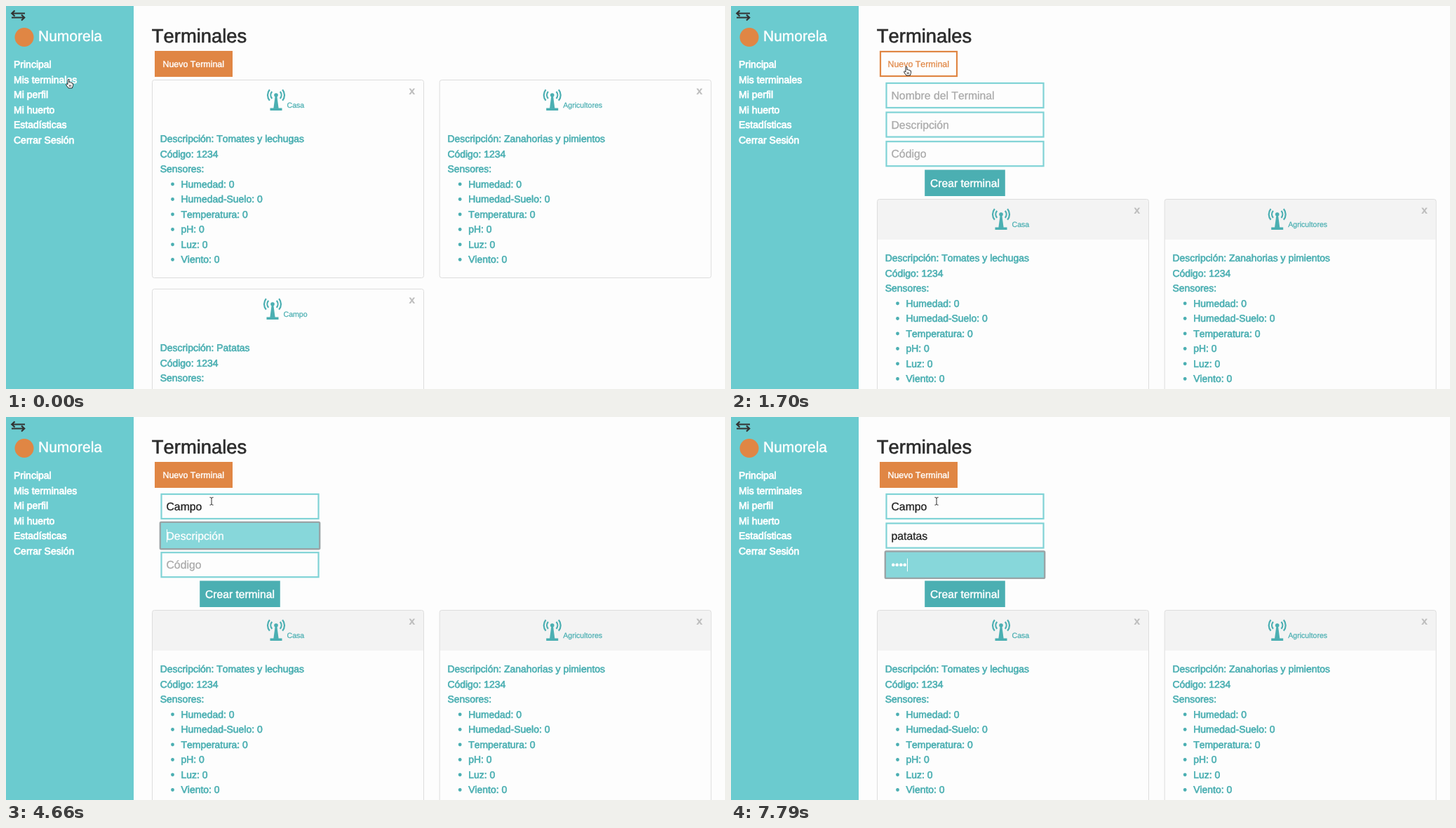
Animation, 1025 px wide and 546 px high, one loop 8 s. Source, as an HTML page:

```html
<!DOCTYPE html>
<html lang="es">
<head>
<meta charset="utf-8">
<title>Terminales</title>
<style>
  html, body { margin: 0; width: 100%; height: 100%; overflow: hidden; background: #fdfdfd; }
  #stage { display: block; }
  text {
    font-family: "Liberation Sans", Arial, sans-serif; font-kerning: none;
    white-space: pre; text-rendering: geometricPrecision;
  }
</style>
</head>
<body>
<svg id="stage" width="1025" height="546" viewBox="0 0 1025 546"></svg>
<script>
const LOOP = 8000;
const TEAL = '#4bafb2', ORANGE = '#e08644', PAGE = '#fdfdfd';
const stage = document.getElementById('stage');
const pen = document.createElement('canvas').getContext('2d');

const menu = ['Principal', 'Mis terminales', 'Mi perfil', 'Mi huerto', 'Estadísticas', 'Cerrar Sesión'];
const sensors = ['Humedad', 'Humedad-Suelo', 'Temperatura', 'pH', 'Luz', 'Viento'];
const cards = [
  { x: 208, dy: 0, name: 'Casa', icon: 177, crop: 'Tomates y lechugas' },
  { x: 617.7, dy: 0, name: 'Agricultores', icon: 161, crop: 'Zanahorias y pimientos' },
  { x: 208, dy: 298, name: 'Campo', icon: 172, crop: 'Patatas' }
];
// keys: the time of each keystroke; rest: when the caret is blinked off
const fields = [
  { hint: 'Nombre del Terminal', value: 'Campo', focus: 2290, blur: 4660,
    keys: [3630, 3780, 3930, 4060, 4210], rest: [2880, 3330] },
  { hint: 'Descripción', value: 'patatas', focus: 4660, blur: 6590,
    keys: [5400, 5550, 5700, 5700, 5840, 5990, 6140], rest: [5110, 5400] },
  { hint: 'Código', value: '••••', focus: 6590, blur: LOOP,
    keys: [7190, 7340, 7640, 7790], rest: [7040, 7190] }
];
const pointer = [
  [0, 85, 104], [140, 103, 102], [290, 172, 93], [500, 232, 88], [650, 246, 86],
  [1850, 283, 113], [1990, 293, 120]
];

const within = (t, from, to) => t >= from && t < to;

function rect(x, y, w, h, fill, extra = '') {
  return `<rect x="${x}" y="${y}" width="${w}" height="${h}" fill="${fill}" ${extra}/>`;
}

// weight thickens the regular face towards a medium one
function text(x, y, str, size, fill, weight = 0, extra = '') {
  return `<text x="${x}" y="${y}" font-size="${size}" fill="${fill}" stroke="${fill}" stroke-width="${weight}" ${extra}>${str}</text>`;
}

function sidebar() {
  const arrows = '<path d="M9 10.5H27M12.5 6.5L8.3 10.5L12.5 14.5M8 16.5H25.5M22 12.5L26.2 16.5L22 20.5" fill="none" stroke="#333" stroke-width="2.2"/>';
  return rect(0, 0, 182, 546, '#6bcbcf') + arrows +
    `<circle cx="26" cy="44.5" r="13.5" fill="${ORANGE}"/>` +
    text(46, 50, 'Numorela', 21, '#fff', 0.4) +
    menu.map((item, i) => text(11, 88 + i * 21.5, item, 14, '#fff', 0.75)).join('');
}

function newButton(hover) {
  return hover
    ? rect(213, 65, 109, 35, PAGE, `stroke="${ORANGE}" stroke-width="2.2"`) + text(223.5, 87, 'Nuevo Terminal', 12.4, ORANGE, 0.25)
    : rect(212, 64, 111, 37, ORANGE) + text(223.5, 87, 'Nuevo Terminal', 12.4, '#fff', 0.4);
}

function antenna(x, y) {
  const arc = (r, side) => {
    const dx = side * r * 0.76, dy = r * 0.65;
    return `M${dx} ${-dy}A${r} ${r} 0 0 ${side > 0 ? 1 : 0} ${dx} ${dy}`;
  };
  const waves = [7.6, 12].map(r => arc(r, -1) + arc(r, 1)).join('');
  return `<g transform="translate(${x} ${y})" fill="${TEAL}">
    <path d="${waves}" fill="none" stroke="${TEAL}" stroke-width="2.2"/>
    <circle r="2.8"/>
    <path d="M-1.4 2H1.4L3.6 18.5H8.5V22H-8.5V18.5H-3.6Z"/></g>`;
}

function card({ x, dy, name, icon, crop }, top, shaded) {
  const y = top + dy;
  const line = (dx, row, str) => text(x + dx, y + 89 + row * 21.5, str, 13.95, TEAL, 0.65);
  return rect(x + 0.5, y + 0.5, 387, 282, PAGE, 'rx="3"') +
    (shaded ? rect(x + 1, y + 1, 386, 57, '#f3f3f3') : '') +
    rect(x + 0.5, y + 0.5, 387, 282, 'none', 'rx="3" stroke="#ddd"') +
    antenna(x + icon, y + 22) +
    text(x + icon + 15.5, y + 40, name, 10.6, TEAL, 0.25) +
    text(x + 366.5, y + 21, 'x', 15.5, '#bdbdbd', 0.2, 'font-weight="bold"') +
    line(11.7, 0, 'Descripción: ' + crop) + line(11.7, 1, 'Código: 1234') + line(11.7, 2, 'Sensores:') +
    sensors.map((s, i) =>
      `<circle cx="${x + 29.5}" cy="${y + 149 + i * 21.5}" r="2.4" fill="${TEAL}"/>` + line(41.5, 3 + i, s + ': 0')
    ).join('');
}

function field(f, i, x, w, t) {
  const y = 109 + i * 41.6, size = 15.75;
  const focused = within(t, f.focus, f.blur);
  const typed = f.value.slice(0, f.keys.filter(k => t >= k).length);
  const color = focused ? '#fff' : typed ? '#222' : '#a9a9a9';
  const box = focused
    ? rect(x, y, w, 37, '#87d7da') +
      rect(x - 0.7, y - 0.7, w + 1.4, 38.4, 'none', 'rx="1.5" stroke="#929c9e" stroke-width="2.4" stroke-opacity=".9"')
    : rect(x + 1, y + 1, w - 2, 35, PAGE, 'stroke="#80d3d6" stroke-width="2.2"');
  let caret = '';
  if (focused && !within(t, ...f.rest)) {
    pen.font = `${size}px "Liberation Sans", Arial, sans-serif`;
    caret = rect(Math.round(x + 8 + pen.measureText(typed).width), y + 9.5, 1, 18.5, '#fff');
  }
  return box +
    `<svg x="${x + 7}" y="${y}" width="${Math.max(0, w - 15)}" height="37">${text(1, 24.3, typed || f.hint, size, color, 0.3)}</svg>` + caret;
}

function form(open, t) {
  const w = 250 * open - 24, x = open < 1 ? 220 : 220.5;
  if (w < 4) return '';
  const mid = x + w / 2;
  return `<g opacity="${open}">` + fields.map((f, i) => field(f, i, x, w, t)).join('') +
    rect(mid - 57.3, 233.5, 114.6, 37.5, TEAL) +
    text(mid, 258, 'Crear terminal', 15.6, '#fff', 0.45, 'text-anchor="middle"') + '</g>';
}

function cursor(x, y, beam) {
  return beam
    ? `<path transform="translate(${x} ${y})" d="M-2.5 -5.5Q0 -5.5 0 -4Q0 -5.5 2.5 -5.5M0 -4V4M-2.5 5.5Q0 5.5 0 4Q0 5.5 2.5 5.5" fill="none" stroke="#333"/>`
    : `<path transform="translate(${x} ${y})" d="M3 8V1.7Q3 .5 4 .5T5 1.7V5Q6.5 4 7 5.4Q8.3 4.7 8.8 6Q10.5 5.5 10.5 7.2V9.5L9.3 13H4L1 9Q0 7.2 1.4 7ZM5.3 8.5V11M7.3 8.5V11" fill="#fff" stroke="#222" stroke-width="1"/>`;
}

// The form unfolds with a cosine swing, redrawn every 150 ms
function openness(t) {
  if (t < 1100) return 0;
  const tick = 1100 + 150 * Math.floor((t - 1100) / 150);
  return 0.5 - Math.cos(Math.PI * Math.min(1, (tick - 1029) / 590)) / 2;
}

function scene(t) {
  const open = openness(t);
  const [, px, py] = pointer.filter(p => t >= p[0]).pop();
  return rect(0, 0, 1025, 546, PAGE) + sidebar() +
    text(207.8, 52, 'Terminales', 27.4, '#2c2c2c', 0.6) +
    newButton(within(t, 500, 1850)) +
    form(open, t) +
    cards.map(c => card(c, Math.round(105 + 170 * open), t >= 1100)).join('') +
    cursor(px, py, t >= 1850);
}

let shown = '';
function draw(now) {
  const next = scene(now % LOOP);
  if (next !== shown) stage.innerHTML = shown = next;
  requestAnimationFrame(draw);
}
requestAnimationFrame(draw);
</script>
</body>
</html>
```
